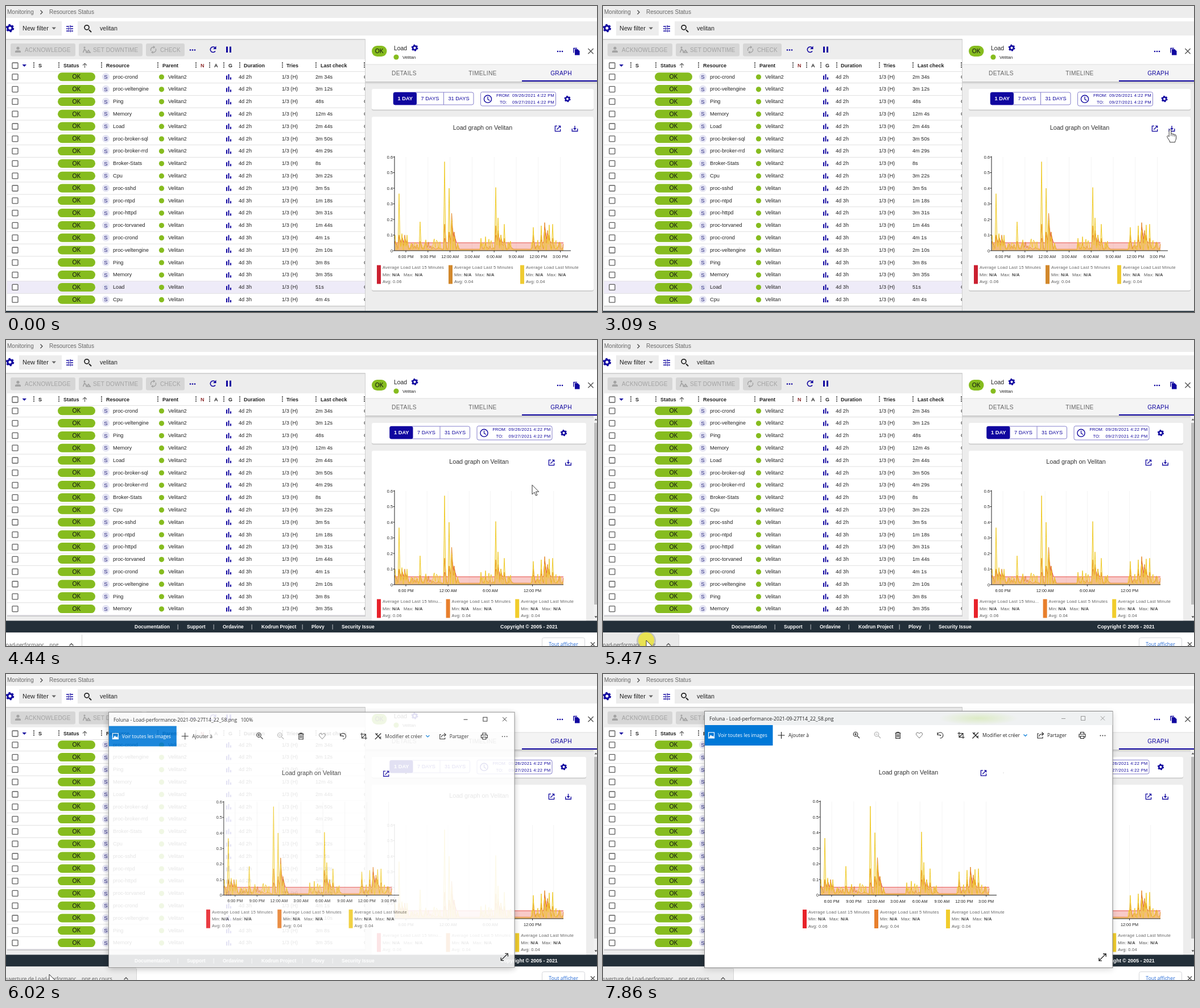
These frames come from a looping animation (1039x539 px, 7.92 s). An HTML page:

```html
<!DOCTYPE html>
<html lang="en">
<head>
<meta charset="utf-8">
<title>Resources status</title>
<style>
html, body { margin: 0; width: 100%; height: 100%; overflow: hidden; background: #fff; }
svg { display: block; width: 100vw; height: 100vh; }
text { font-family: "Liberation Sans", Arial, sans-serif; white-space: pre; }
.ui text { font-family: "Open Sans", "Noto Sans", sans-serif; }
.ui .plot text { font-family: "Liberation Sans", Arial, sans-serif; }
</style>
</head>
<body>
<svg id="stage" viewBox="0 0 1039 539" preserveAspectRatio="none"></svg>
<script>
const LOOP = 7920, NAVY = '#10069f', GREEN = '#86bc1f', INK = '#222', GRAY = '#ededed';

// ---- drawing helpers ----
const rect = (x, y, w, h, fill, extra = '') =>
  `<rect x="${x}" y="${y}" width="${w}" height="${h}" fill="${fill}" ${extra}/>`;
const dot = (x, y, r, fill, extra = '') => `<circle cx="${x}" cy="${y}" r="${r}" fill="${fill}" ${extra}/>`;
const line = (d, color = NAVY, w = 1.3, extra = '') =>
  `<path d="${d}" fill="none" stroke="${color}" stroke-width="${w}" ${extra}/>`;
const shape = (d, fill = NAVY, extra = '') => `<path d="${d}" fill="${fill}" ${extra}/>`;
const at = (x, y, body, s = 1) => `<g transform="translate(${x} ${y}) scale(${s})">${body}</g>`;
const text = (x, y, size, str, fill = INK, { b, a, ls } = {}) =>
  `<text x="${x}" y="${y}" font-size="${size}" fill="${fill}"${b ? ' font-weight="700"' : ''}` +
  `${a ? ` text-anchor="${a}"` : ''}${ls ? ` letter-spacing="${ls}"` : ''}>${str}</text>`;
const layer = (id, body, cls = '') => `<g id="${id}" class="${cls}">${body}</g>`;
const mid = { a: 'middle' };

// ---- icons, centred on 0,0 ----
const gear = (x, y, s = 1) => at(x, y,
  `<circle r="3.6" fill="none" stroke="${NAVY}" stroke-width="2.8"/>` +
  `<circle r="5.2" fill="none" stroke="${NAVY}" stroke-width="2.2" stroke-dasharray="2.72 2.72"/>`, s);
const dots = (x, y, r, gap, fill, vertical) =>
  [-gap, 0, gap].map(d => vertical ? dot(x, y + d, r, fill) : dot(x + d, y, r, fill)).join('');
const openIcon = (x, y) => at(x, y, line('M-1-4.6H-4.6V4.6H4.6V1M1.2-4.6H4.6V-1.2M4.4-4.4L-1.8 1.8'));
const saveIcon = (x, y) => at(x, y, line('M-4.8 0V4.5H4.8V0M0-5V1') + shape('M-3-.8H3L0 2.6Z'));
const cross = (x, y, r, color, w) => at(x, y, line(`M${-r} ${-r}L${r} ${r}M${r} ${-r}L${-r} ${r}`, color, w));
const box = (x, y) => rect(x - 5, y - 5, 10, 10, '#fff', 'rx="1" stroke="#5c5c5c" stroke-width="1.3"');
const chevron = (x, y, color = '#555') => at(x, y, line('M-3.4 1.7L0-1.7 3.4 1.7', color, 1.4));

// ---- chart ----
let seed = 11;
const rnd = () => (seed = seed * 16807 % 2147483647) / 2147483647;
// x, height of the 1, 5 and 15 minute peak
const peaks = [
  [684, .1, .06, .06], [691, .365, .1, .09], [696, .11, .1, .09], [701, .08, .1, .08], [705, .1, .07, .06],
  [728, .185, .06, .05], [738, .07, .06, .05], [771, .57, .17, .08], [779, .4, .12, .1], [783.5, .2, .24, .17],
  [788, .09, .12, .1], [794, .05, .04, .05], [835, .08, .05, .05], [843, .09, .05, .05], [861, .405, .16, .1],
  [865, .21, .13, .11], [870, .1, .1, .08], [876, .17, .08, .06], [927, .15, .1, .06], [941, .16, .1, .07],
  [947, .13, .18, .15], [952, .1, .13, .11], [955, .165, .1, .08], [961, .17, .08, .05]
];
const hat = (d, rise, fall) => Math.max(0, d < 0 ? 1 + d / rise : 1 - d / fall);
const busy = x => x < 764 || (x > 833 && x < 890) || x > 923;
function curve(col, rise, fall, base, noise) {
  let d = '', goal = 0, walk = 0;
  for (let i = 0; i <= 593; i++) {
    const x = 683.5 + i / 2;
    if (i % 4 === 0) goal = busy(x) ? rnd() ** 3 : 0;
    walk += (goal - walk) * .45;
    let v = base + walk * noise;
    for (const p of peaks) v = Math.max(v, p[col] * hat(x - p[0], rise, fall));
    d += `L${x} ${(431 - v * 275).toFixed(1)}`;
  }
  return 'M' + d.slice(1);
}
const curves = [curve(3, 3, 8, .051, 0), curve(2, 2, 4, .01, .05), curve(1, 2, 2.2, .003, .08)];
const lines = ['#e2342c', '#e58a2a', '#f0cb2a'];

function chart(wide, keys, save) {
  const c = wide ? 838 : 831.5, step = wide ? 38.8 : 37.1, right = wide ? 993 : 980;
  const small = { ls: .23 }, bold = { ls: .23, b: 1 };
  let s = text(c, 218, 10.75, 'Load graph on Velitan', '#333', mid) + openIcon(wide ? 970 : 959, 216);
  if (save) s += saveIcon(wide ? 1000 : 988.5, 216);
  for (let i = 0; i < 8; i++) {
    const x = 703 + i * step, h = (18 + i * 3) % 24;
    s += line(`M${x} 266V431`, '#f4f4f4', 1);
    if (wide || i % 2 === 0)
      s += line(`M${x} 431V434`, '#333', 1) +
        text(x, 444, 7.3, `${h % 12 || 12}:00 ${h < 12 ? 'AM' : 'PM'}`, INK, mid);
  }
  curves.forEach((d, i) => {
    s += shape(`${d}V431H683.5Z`, lines[i], `fill-opacity="${[.26, .3, .24][i]}"`) + line(d, lines[i], 1);
  });
  s += line(`M683 264.5V431H${right}`, INK, 1);
  for (let i = 0; i < 7; i++) {
    const y = 431 - i * 27.5;
    s += line(`M680.5 ${y}H683`, INK, 1) + text(680, y + 2.6, 7.3, i ? '0.' + i : '0', INK, { a: 'end' });
  }
  const names = [wide ? '15 Minutes' : '15 Minu...', '5 Minutes', 'Minute'];
  names.forEach((n, i) => {
    const x = 652 + i * (wide ? 126 : 121.6), tx = x + 10;
    s += rect(x, 456.5, 7, 33, keys[i]) + text(tx, 463.3, 7.5, 'Average Load Last ' + n, '#666', small) +
      text(tx, 475.6, 7.5, 'Min:', '#555', small) + text(tx + 17, 475.6, 7.5, 'N/A', '#444', bold) +
      text(tx + 37, 475.6, 7.5, 'Max:', '#555', small) + text(tx + 57, 475.6, 7.5, 'N/A', '#444', bold) +
      text(tx, 488, 7.5, 'Avg: 0.0' + (i ? 4 : 6), '#555', small);
  });
  return `<g class="plot">${s}</g>`;
}

// ---- page ----
function header() {
  let s = rect(0, 0, 1039, 539, GRAY) + rect(0, 21, 1039, 37, '#fff') +
    text(2, 14, 10, 'Monitoring', '#666') + line('M60.5 7.5L64 11 60.5 14.5', '#444', 1.3) +
    text(76, 14, 10, 'Resources Status', '#666') +
    rect(23, 27, 75, 25, GRAY) + rect(126, 27, 913, 25, GRAY) + gear(7, 39, 1.15) +
    text(29, 43, 11, 'New filter') + shape('M80.5 37.5H88L84.2 41.5Z', '#666') +
    line('M106 36H111M114 36H118M106 40H108.5M111.5 40H118M106 44H112M115 44H118M113 34V38M110 38V42M113.5 42V46', NAVY, 1.3) +
    line('M146 42L150 46', INK, 1.9) + dot(142, 37.8, 4, 'none', `stroke="${INK}" stroke-width="1.7"`) +
    text(165, 43, 10.7, 'velitan') + rect(0, 58, 1039, 1, '#c6c6c6') + rect(0, 59, 1039, 1.5, '#e2e2e2');
  [[8, 114, 33, 'ACKNOWLEDGE'], [128, 112, 153, 'SET DOWNTIME'], [246, 68, 271, 'CHECK']].forEach(([x, w, tx, n]) => {
    s += rect(x, 66, w, 22.5, '#d6d6d6', 'rx="3"') + text(tx, 80.7, 10, n, '#a3a3a3', { ls: .15 });
  });
  return s + dot(21, 74.3, 2.6, '#a3a3a3') + shape('M16 82V80Q16 78 21 78T26 80V82Z', '#a3a3a3') +
    dot(138, 73, 1.6, '#a3a3a3') + line('M135.5 82L138 76 141 79V82M142 82L145 78 148 82Z', '#a3a3a3', 1.7) +
    line('M255 79A4.5 4.5 0 0 1 260 72.6M263 75A4.5 4.5 0 0 1 257.5 81.4', '#a3a3a3', 1.4) +
    shape('M259 70L262.5 72.6 259 75.2ZM258.5 79L255 81.5 258.5 84Z', '#a3a3a3') +
    dots(328, 77.5, 1.3, 4, NAVY) +
    line('M368 79.5A4.8 4.8 0 1 1 367.3 73.2', NAVY, 1.6) + shape('M369.5 70.5V76H364Z') +
    rect(387, 71.5, 3, 10.5, NAVY) + rect(393, 71.5, 3, 10.5, NAVY);
}

const rows = ['proc-crond|2m 34s', 'proc-veltengine|3m 12s', 'Ping|48s', 'Memory|12m 4s', 'Load|2m 44s',
  'proc-broker-sql|3m 50s', 'proc-broker-rrd|4m 29s', 'Broker-Stats|8s', 'Cpu|3m 22s', 'proc-sshd|3m 5s',
  'proc-ntpd|1m 18s', 'proc-httpd|3m 31s', 'proc-torvaned|1m 44s', 'proc-crond|4m 1s', 'proc-veltengine|2m 10s',
  'Ping|3m 8s', 'Memory|3m 35s', 'Load|51s', 'Cpu|4m 4s'];
function table() {
  let s = rect(2, 94, 630, 434, '#fff') + rect(2, 528, 630, 1.5, '#c4c4c4');
  s += box(16, 105) + shape('M28.5 103H36L32.2 107Z') + line('M138.5 109V101M135 104.5L138.5 101 142 104.5', '#666', 1.2);
  [49, 93, 168, 267, 334, 358, 383, 411, 486, 545, 630].forEach(x => s += dots(x, 104, 1.1, 3.6, '#333', true));
  [[57, 'S'], [101, 'Status'], [176, 'Resource'], [275, 'Parent'], [342, 'N', '#8c2b2b'], [366, 'A'], [391, 'G'],
    [418, 'Duration'], [493, 'Tries'], [553, 'Last check']].forEach(([x, n, c]) => s += text(x, 107.5, 9, n, c, { b: 1 }));
  s += rect(2, 115, 630, 1, '#e0e0e0');
  rows.forEach((row, i) => {
    const [name, last] = row.split('|'), y = 124.6 + i * 21.8, b = y + 3;
    if (i === 17) s += rect(2, y - 10.5, 630, 21.5, '#eeebf8');
    s += rect(2, y + 10.6, 630, 1, '#e0e0e0') + box(16, y + .2) +
      rect(91, y - 7.3, 66, 15, GREEN, 'rx="7.5"') + text(124, y + 3.6, 10.3, 'OK', '#111', mid) +
      dot(175.5, y, 6.6, '#e4e4f3') + text(175.5, y + 3.4, 9.5, 'S', '#22207a', mid) +
      text(188, b, 9.2, name) + dot(273.5, y + .4, 4.6, GREEN) + text(285, b, 9.2, i < 9 ? 'Velitan2' : 'Velitan') +
      rect(387, y - 2, 2, 7, NAVY) + rect(390.5, y - 4.5, 2, 9.5, NAVY) + rect(394, y + 1, 2, 4, NAVY) +
      text(409, b, 9.2, i < 10 || i === 11 ? '4d 2h' : '4d 3h') + text(485, b, 9.2, '1/3 (H)') +
      text(544, b, 9.2, last) + text(629, b, 9.2, 'O');
  });
  return s;
}

function panelTop() {
  let s = rect(631, 58, 1, 481, '#cfcfcf') + rect(632, 58, 407, 481, GRAY) + rect(632, 58, 407, 45, '#fff') +
    rect(632, 103, 407, 30, '#f4f4f4') + rect(632, 102.5, 407, 1, '#dedede') + rect(632, 133, 407, 5, 'url(#drop)') +
    rect(907, 131, 132, 2, NAVY) + rect(643, 70, 26.5, 19, GREEN, 'rx="9.5"') + text(656.2, 83.4, 10.3, 'OK', '#111', mid) +
    text(682, 77.5, 10.4, 'Load') + gear(718.5, 73.8, .95) + dot(686, 90, 4.6, GREEN) + text(697, 93, 7.8, 'Velitan') +
    dots(974, 80, 1.3, 4, NAVY) + line('M998 82.5V74.5H1004', NAVY, 1.4) +
    shape('M1000 76H1005L1008.5 79.5V86.5H1000Z') + cross(1028, 79.7, 4.6, '#555', 1.4);
  [[700, 'DETAILS', '#666'], [838, 'TIMELINE', '#666'], [976, 'GRAPH', NAVY]].forEach(([x, n, c]) =>
    s += text(x, 121.8, 10.2, n, c, { ...mid, ls: .3 }));
  return s;
}
const card = (y, w, h) => rect(643, y + 1, w, h + .8, '#cbcbcb', 'rx="3"') + rect(643, y, w, h, '#fff', 'rx="3"');
function ranges() {
  const edge = 'rx="3" stroke="#8680cc" stroke-width="1"', stamp = { ls: .37 };
  return rect(681, 152, 141, 22, '#fff', edge) + rect(681, 152, 41, 22.3, NAVY, 'rx="3"') + line('M769.5 152V174', '#8680cc', 1) +
    text(701.8, 166.2, 9.3, '1 DAY', '#fff', { ...mid, b: 1 }) + text(745.5, 166.2, 9.2, '7 DAYS', NAVY, mid) +
    text(796, 166.2, 9.2, '31 DAYS', NAVY, mid) + rect(834.5, 151.5, 132, 24.5, '#fff', edge) +
    dot(847, 163.8, 6.6, 'none', `stroke="${NAVY}" stroke-width="1.4"`) + line('M847 159.5V164.3L850.5 166.4', NAVY, 1.2) +
    text(862, 160.4, 7.5, 'FROM:', NAVY) + text(890, 160.4, 7.5, '09/26/2021 4:22 PM', NAVY, stamp) +
    text(868, 172.4, 7.5, 'TO:', NAVY) + text(890, 172.4, 7.5, '09/27/2021 4:22 PM', NAVY, stamp) + gear(987, 163.7, .9);
}
const vivid = ['#e8222a', '#e87f2c', '#f1cd2c'];
const tall = card(146, 390, 36.5) + card(195, 390, 306) + ranges() +
  chart(true, ['#cb2030', '#d2882c', '#efcb32'], true) + rect(0, 537, 1039, 2, '#23313b');

function short() {
  let s = card(146, 377, 36.5) + card(195, 377, 310) + at(-6.5, 0, ranges()) + chart(false, vivid, true) +
    rect(1033, 134, 6, 361, '#f1f1f1') + rect(1034, 146, 5, 320, '#bdbdbd') +
    shape('M1034.5 141.5H1039.5L1037 138.5Z', '#555') + shape('M1034.5 486.5H1039.5L1037 489.5Z', '#444') +
    rect(0, 486, 632, 9, GRAY) + rect(2, 485.5, 630, 1.5, '#c4c4c4') + rect(0, 494.5, 1039, 45, '#232f39');
  [[226, 'Documentation'], [318, 'Support'], [381, 'Ordavine'], [449, 'Kodrun Project'], [537, 'Plovy'], [590, 'Security Issue']]
    .forEach(([x, n]) => s += text(x, 508, 8.5, n, '#fff', { b: 1 }));
  [302, 365, 432, 521, 574].forEach(x => s += text(x, 508, 8.5, '|', '#fff', mid));
  return s + text(869, 507.5, 8.9, 'Copyright © 2005 - 2021', '#fff', { b: 1 });
}

// ---- download bar ----
const item = (end, label, x) => text(x, 540.4, 8.9, label, '#555') + chevron(end - 18, 536.5) +
  rect(end, 519, 1, 20, '#d5d5d5');
const bar = rect(0, 515, 1039, 30, '#fff') + rect(0, 515, 1039, 1, '#d8d8d8') +
  layer('hover', rect(0, 516, 133, 25, '#e9e9e9')) +
  layer('file', item(133, 'Load-performanc....png', -5)) +
  layer('opening', rect(0, 516, 229, 25, '#ececec') + item(229, 'Ouverture de Load-performanc....png en cours', -6)) +
  rect(942.5, 524.5, 75, 24, '#fff', 'rx="3" stroke="#d4d6da"') +
  text(980, 539, 8.8, 'Tout afficher', '#2b6fd8', mid) + cross(1031.5, 536, 3.6, '#555', 1.4);

// ---- image viewer ----
function viewer() {
  const k = '#222', pale = '#aaa';
  const lens = (x, c, d) => at(x, 107, dot(-1, -1, 3.8, 'none', `stroke="${c}" stroke-width="1.1"`) + line('M1.8 1.8L6 6' + d, c, 1.1));
  const buttons = c => line('M806 78.5H813', c, 1) + rect(840.5, 74.5, 7, 7, 'none', `stroke="${c}"`) + cross(878.5, 78, 3.6, c, 1);
  return layer('shade', rect(178, 68, 718, 452, '#000', 'filter="url(#soft)"')) +
    rect(178.5, 65.5, 717.5, 452, '#fff', 'stroke="#858585" stroke-width="1"') +
    layer('idle', rect(179, 66, 716.5, 24, '#eff1f2') + rect(590, 66, 140, 24, 'url(#glow)') + buttons('#999')) +
    layer('active', buttons(k) + text(412, 82, 8.5, '100%', k)) +
    text(187, 82, 8.7, 'Foluna - Load-performance-2021-09-27T14_22_58.png', k) +
    rect(179, 90, 119.5, 36, '#0078d7') + rect(185.5, 103, 10, 10, 'none', 'stroke="#fff" stroke-width="1.2"') +
    shape('M186 112.5L189.5 107 192 110 193.5 108.5 195.5 112.5Z', '#fff') +
    text(202, 111.2, 8.5, 'Voir toutes les images', '#fff') +
    line('M307.5 108H319.5M313.5 102V114', k, 1.1) + text(326, 111.2, 8.5, 'Ajouter à', k) +
    lens(445, k, 'M-3-1H1M-1-3V1') + lens(482, pale, 'M-3-1H1') +
    line('M513.5 104H523.5M516.5 104V102.5H520.5V104M514.8 104V113.5H522.2V104M517.3 106V111.5M519.7 106V111.5', k, 1.2) +
    line('M556 113L551 107.5C549 103 554 101.5 556 105 558 101.5 563 103 561 107.5Z', '#777', 1) +
    line('M588 107A5 5 0 1 1 592.5 113M588 103V107.3H592', k, 1.1) + dot(593, 108, 1.1, k) +
    line('M626 102V111.5H635.5M623.5 104.5H633V114M626 111.5L633 104.5', k, 1.1) +
    line('M650 103L660 113M649.5 113.5L660 103M651 106L654 103M657 112L660 109', k, 1.3) +
    text(667, 111.2, 8.5, 'Modifier et créer', k) + line('M739.5 106.5L742.5 109.5 745.5 106.5', '#0078d7', 1.2) +
    line('M766 105H764V113H773V110.5M766.5 110Q767 105.5 774 105.5M771.5 102.5L774.5 105.5 771.5 108.5', k, 1.1) +
    text(781, 111.2, 8.5, 'Partager', k) +
    line('M839.5 106V102.5H845.5V106M839.5 111H837V106H848V111H845.5M839.5 109.5H845.5V113.5H839.5Z', k, 1.1) +
    dots(878.5, 108.5, .9, 4, k) + at(-301, -41.5, chart(true, vivid)) + dot(704, 174, .6, '#aaa') +
    line('M872 505L884 493M879 493H884.3V498M872 500V505.2H877', k, 1.3);
}

// ---- pointer ----
const edge = 'stroke="#222" stroke-width=".9" stroke-linejoin="round"';
const pointer =
  layer('halo', dot(0, 1, 17, '#8a8a80', 'id="ring" opacity=".4"') + dot(0, 0, 14, '#f6ec2c', 'opacity=".74"')) +
  layer('arrow', shape('M0 0V16.5L3.9 12.9 6.5 18.8 8.9 17.8 6.4 12H11.7Z', '#fff', edge)) +
  layer('hand', shape('M-1.8 1.5C-1.8-.6 1.8-.6 1.8 1.5V7.5C2.5 6.4 5 6.6 5 8.2 6 7.3 8 7.6 8 9.2 9 8.5 10.6 9 10.6 10.6V15C10.6 18 8.6 19 8.6 22H-.4C-.4 19-3 17.5-5.2 12.6-6 10.8-3.6 9.8-1.8 12Z', '#fff', edge) +
    line('M1.8 7.5V11M5 8.2V11.5M8 9.2V12', '#222', .8));

const stage = document.getElementById('stage');
stage.innerHTML = `<defs>
  <radialGradient id="glow"><stop offset="0" stop-color="#dcebc4"/><stop offset="1" stop-color="#eff1f2"/></radialGradient>
  <linearGradient id="drop" x2="0" y2="1"><stop offset="0" stop-color="#c4c4c4"/><stop offset="1" stop-color="${GRAY}"/></linearGradient>
  <filter id="soft" x="-10%" y="-10%" width="120%" height="120%"><feGaussianBlur stdDeviation="6"/></filter></defs>` +
  header() + table() + panelTop() + layer('tall', tall) + layer('short', short()) + layer('bar', bar, 'ui') +
  layer('viewer', viewer(), 'ui') +
  layer('tip', rect(971, 231, 57, 16, '#616161', 'rx="3" opacity=".93"') + text(999.5, 241.8, 7.5, 'Export to png', '#fff', mid)) +
  layer('pointer', pointer);

// ---- motion ----
const el = {};
stage.querySelectorAll('[id]').forEach(n => el[n.id] = n);
const show = (id, on) => el[id].style.display = on ? '' : 'none';
const put = (id, v) => el[id].setAttribute('transform', v);
const fade = (id, v) => el[id].setAttribute('opacity', v);

// rows of [time, value, value...], linear between them
function track(keys, t) {
  if (t <= keys[0][0]) return keys[0].slice(1);
  for (let i = 1; i < keys.length; i++) {
    const [a, b] = [keys[i - 1], keys[i]];
    if (t < b[0]) return b.slice(1).map((v, j) => a[j + 1] + (v - a[j + 1]) * (t - a[0]) / (b[0] - a[0]));
  }
  return keys[keys.length - 1].slice(1);
}
const path = [[460, 1029, 234], [670, 1007, 226], [930, 1007, 226], [1070, 997, 218], [1610, 997, 218], [1750, 985, 268],
  [1950, 960, 249], [2149, 960, 249], [2150, 997, 218], [3900, 997, 218], [4300, 928, 254], [4440, 928, 254],
  [4650, 297, 524], [4710, 290, 545], [4910, 212, 534], [5280, 76, 529], [6410, 76, 529], [7170, 964, 521],
  [7240, 985, 524], [7450, 1028, 534]];
const rise = [[3090, 24], [3230, 12], [3370, 4], [3500, 0]];
const slide = [[3500, -160], [3770, -113], [4000, -40], [4250, 0]];
const pop = [[5880, .95, .15], [5950, .985, .6], [6020, .9945, .88], [6090, .999, .96], [6160, 1, 1]];

function draw(t) {
  const [x, y] = track(path, t), hand = (t >= 1000 && t < 1640) || (t >= 2150 && t < 3960);
  show('pointer', (t >= 460 && t < 4710) || (t >= 4910 && t < 7450));
  put('pointer', `translate(${x} ${y})`);
  show('hand', hand);
  show('arrow', !hand);
  show('halo', (t >= 1540 && t < 1950) || (t >= 5400 && t < 5610));
  show('ring', t >= 5400);
  fade('halo', t < 2000 ? track([[1670, 1], [1950, 0]], t)[0] : 1);
  show('tip', t >= 1210 && t < 1670);
  fade('tip', track([[1210, .6], [1270, 1]], t)[0]);

  show('tall', t < 3870);
  show('short', t >= 3870);
  show('bar', t >= 3090);
  put('bar', `translate(0 ${track(rise, t)[0]})`);
  put('file', `translate(${track(slide, t)[0]} 0)`);
  show('hover', t >= 4910);
  show('file', t < 5610);
  show('opening', t >= 5610);

  const [s, o] = track(pop, t), idle = t >= 7860;
  show('viewer', t >= 5880);
  put('viewer', `translate(537 ${291 + (1 - s) * 100}) scale(${s}) translate(-537 -291)`);
  fade('viewer', o);
  fade('shade', idle ? .16 : .28);
  show('idle', idle);
  show('active', !idle);
}
function tick() {
  draw(performance.now() % LOOP);
  requestAnimationFrame(tick);
}
tick();
</script>
</body>
</html>
```
